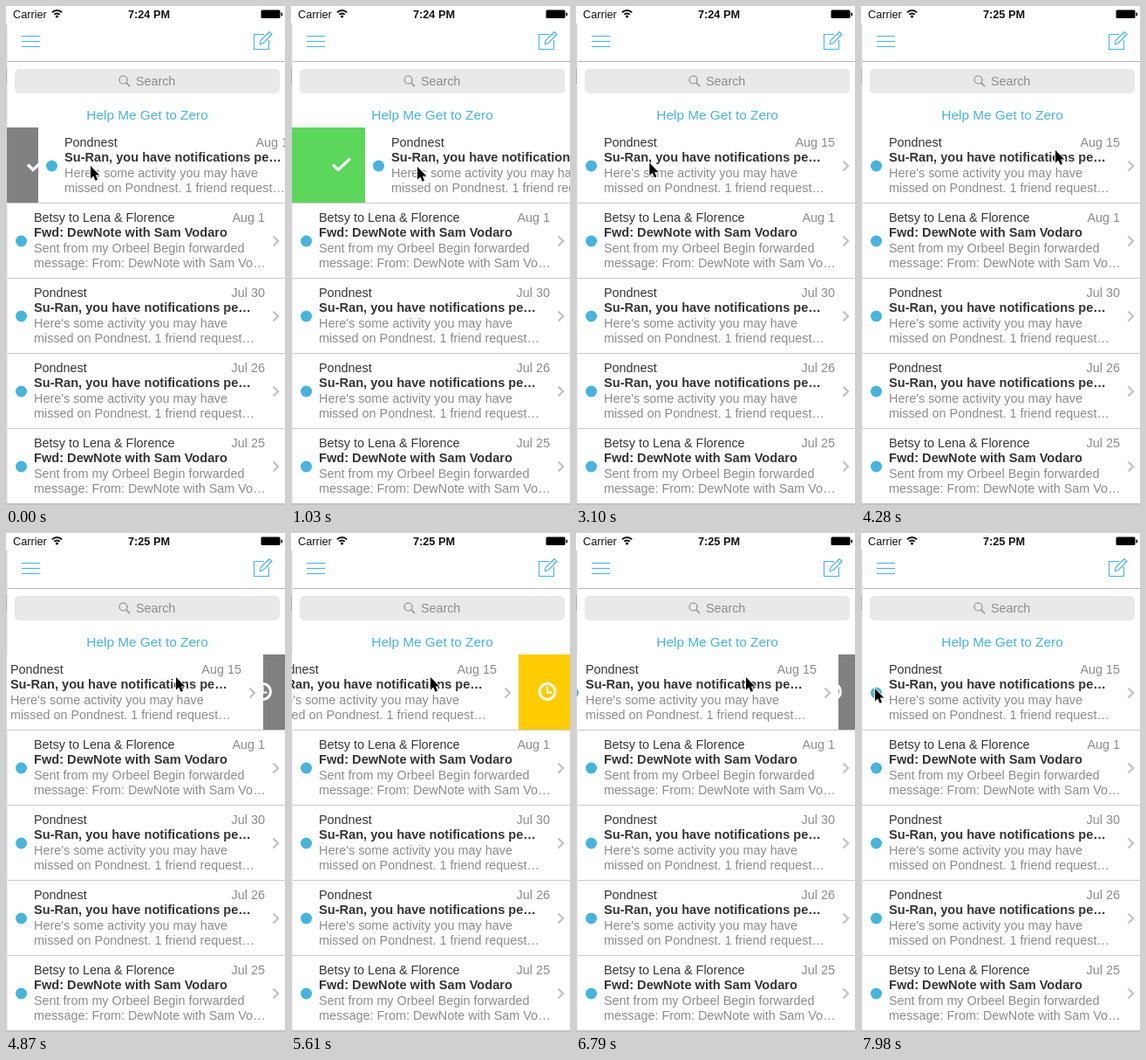
Write an HTML page with a canvas that moves like this. It is 320x571 px and loops after 8000 ms.

```html
<!DOCTYPE html>
<html lang="en">
<head>
<meta charset="utf-8">
<title>Inbox swipe</title>
<style>
html, body { margin: 0; width: 100%; height: 100%; overflow: hidden; background: #fff; }
canvas { display: block; width: 320px; height: 571px; }
</style>
</head>
<body>
<canvas id="stage"></canvas>
<script>
const W = 320, H = 571, LOOP = 8000, STEP = 147.7;
const ROW_TOP = 139, ROW_H = 86, LEFT = 2, RIGHT = 322, PULL = 60;
const BLUE = '#45b5dd', DARK = '#343434', GREY = '#8b8b8b';
const SANS = '"Liberation Sans", Arial, sans-serif';

const canvas = document.getElementById('stage');
const ctx = canvas.getContext('2d');
const dpr = window.devicePixelRatio || 1;
canvas.width = W * dpr;
canvas.height = H * dpr;

const notice = {
  from: 'Pondnest',
  title: 'Su-Ran, you have notifications pe…',
  lines: ["Here's some activity you may have", 'missed on Pondnest. 1 friend request…']
};
const forward = {
  from: 'Betsy to Lena & Florence',
  title: 'Fwd: DewNote with Sam Vodaro',
  lines: ['Sent from my Orbeel Begin forwarded', 'message: From: DewNote with Sam Vo…']
};
const mails = [
  { ...notice, date: 'Aug 15' },
  { ...forward, date: 'Aug 1' },
  { ...notice, date: 'Jul 30' },
  { ...notice, date: 'Jul 26' },
  { ...forward, date: 'Jul 25' }
];

// step, row offset, pointer x, pointer y
const keys = [
  [0, 35, 97, 183], [7, 83, 145, 184], [8, 88, 150, 184], [10, 95, 157, 184],
  [12, 95, 157, 184], [16, 49.5, 110, 181], [20, 0, 60, 182],
  [27, 0, 230, 165], [28, 0, 230, 165], [29, 0, 223, 165],
  [38, -61, 160, 165], [41, -85, 136, 165], [46, -21, 195, 165],
  [48, 0, 216, 165], [51, 0, 32, 178], [54, 0, 16, 178]
];

function poseAt(step) {
  let i = 1;
  while (i < keys.length - 1 && keys[i][0] < step) i++;
  const a = keys[i - 1], b = keys[i];
  const p = Math.min(1, (step - a[0]) / (b[0] - a[0]));
  const [, offset, x, y] = a.map((v, n) => v + (b[n] - v) * p);
  return { offset, x, y };
}

function text(str, x, y, size, color, { bold = false, align = 'left' } = {}) {
  ctx.font = `${bold ? 'bold ' : ''}${size}px ${SANS}`;
  ctx.textAlign = align;
  ctx.fillStyle = color;
  ctx.fillText(str, x, y);
}

function box(x, y, w, h, color) {
  ctx.fillStyle = color;
  ctx.fillRect(x, y, w, h);
}

function line(points, color, width) {
  ctx.beginPath();
  points.forEach(([x, y]) => ctx.lineTo(x, y));
  ctx.strokeStyle = color;
  ctx.lineWidth = width;
  ctx.stroke();
}

function disc(x, y, r, color) {
  ctx.beginPath();
  ctx.arc(x, y, r, 0, 7);
  ctx.fillStyle = color;
  ctx.fill();
}

function ring(x, y, r, color, width, from = 0, to = Math.PI * 2) {
  ctx.beginPath();
  ctx.arc(x, y, r, from, to);
  ctx.strokeStyle = color;
  ctx.lineWidth = width;
  ctx.stroke();
}

function roundBox(x, y, w, h, r, color) {
  ctx.beginPath();
  ctx.roundRect(x, y, w, h, r);
  ctx.fillStyle = color;
  ctx.fill();
}

function drawStatus(clock) {
  text('Carrier', 8, 14, 12.7, '#111');
  for (const r of [4.5, 8]) ring(58.5, 13, r, '#111', 2, -Math.PI * 0.75, -Math.PI * 0.25);
  disc(58.5, 12, 1.6, '#111');
  text(clock, 164, 14, 12.7, '#111', { bold: true, align: 'center' });
  roundBox(292.5, 4.5, 22, 9.5, 1.5, '#000');
  roundBox(315.5, 7.5, 1.5, 4, 0.7, '#000');
}

function drawHeader() {
  for (const y of [34.5, 40.5, 46.5]) line([[18, y], [39, y]], BLUE, 1.1);
  line([[296, 32.5], [284.5, 32.5], [284.5, 49.5], [301.5, 49.5], [301.5, 39]], BLUE, 1.1);
  line([[291, 44], [292, 39.5], [302, 29.5], [305, 32.5], [295, 42.5], [291, 44]], BLUE, 1.1);
  line([[300, 31.5], [303, 34.5]], BLUE, 1);
  box(LEFT, 63, W, 1, '#b5b5b5');
  roundBox(10, 72, 304, 28, 5, '#e9e9ea');
  ring(134.5, 84.5, 4.5, GREY, 1.2);
  line([[137.8, 87.8], [142, 92]], GREY, 1.4);
  text('Search', 149, 91, 14.3, GREY);
  text('Help Me Get to Zero', 162, 130, 15.4, BLUE, { align: 'center' });
}

function drawMail({ from, title, lines, date }, x, y) {
  disc(x + 17.5, y + 44, 6.5, BLUE);
  text(from, x + 32, y + 22, 14.4, DARK);
  text(date, x + 297, y + 22, 14.4, GREY, { align: 'right' });
  text(title, x + 32, y + 39, 14.6, DARK, { bold: true });
  lines.forEach((str, i) => text(str, x + 32, y + 57 + i * 17, 14.4, GREY));
  line([[x + 306.5, y + 38.5], [x + 312, y + 44], [x + 306.5, y + 49.5]], '#c3c3c6', 2.4);
}

function drawCheck(x, y) {
  line([[x - 10, y], [x - 4, y + 6], [x + 10, y - 7]], '#fff', 3.4);
}

function drawClock(x, y) {
  ring(x, y, 9, '#fff', 3);
  line([[x, y - 6], [x, y + 1], [x + 5, y + 1]], '#fff', 2.2);
}

function drawSwipe(offset) {
  const armed = Math.abs(offset) >= PULL;
  const mid = ROW_TOP + 42.5;
  ctx.save();
  ctx.beginPath();
  ctx.rect(1, ROW_TOP, W, ROW_H);
  ctx.clip();
  if (offset > 0) {
    const edge = LEFT + offset;
    box(0, ROW_TOP, W, ROW_H, armed ? '#5bd75b' : '#818181');
    drawCheck(Math.max(35, edge - 27), mid);
    box(edge, ROW_TOP, W, ROW_H, '#fff');
  } else if (offset < 0) {
    const edge = RIGHT + offset;
    box(edge, ROW_TOP, W, ROW_H, armed ? '#ffcc00' : '#818181');
    drawClock(Math.min(294.5, edge + 33), mid);
    box(0, ROW_TOP, edge, ROW_H, '#fff');
  }
  drawMail(mails[0], offset, ROW_TOP);
  ctx.restore();
}

function drawPointer(x, y) {
  ctx.beginPath();
  [[0, 0], [0, 14.5], [3.3, 11.5], [5.6, 16.8], [8, 15.8], [5.8, 10.6], [10.3, 10.4]]
    .forEach(([dx, dy]) => ctx.lineTo(x + dx, y + dy));
  ctx.closePath();
  ctx.strokeStyle = '#fff';
  ctx.lineWidth = 1.6;
  ctx.stroke();
  ctx.fillStyle = '#000';
  ctx.fill();
}

function draw(ms) {
  const step = Math.floor((ms + 8) / STEP);
  const pose = poseAt(step);
  ctx.setTransform(dpr, 0, 0, dpr, 0, 0);
  box(0, 0, W, H, '#fff');
  box(0, 20, 1, H, '#d2d2d2');
  box(1, 20, 1, H, '#ededed');
  box(0, 71, 1, 18, '#b4b4b4');
  drawStatus(step < 24 ? '7:24 PM' : '7:25 PM');
  drawHeader();
  drawSwipe(pose.offset);
  mails.forEach((mail, i) => {
    const y = ROW_TOP + i * ROW_H;
    if (i) drawMail(mail, 0, y);
    box(LEFT, y + ROW_H, W, 1, '#cbcbcb');
  });
  box(0, 569, W, 2, '#c4c4c4');
  drawPointer(pose.x, pose.y);
}

function tick() {
  draw(performance.now() % LOOP);
  requestAnimationFrame(tick);
}
tick();
</script>
</body>
</html>
```
